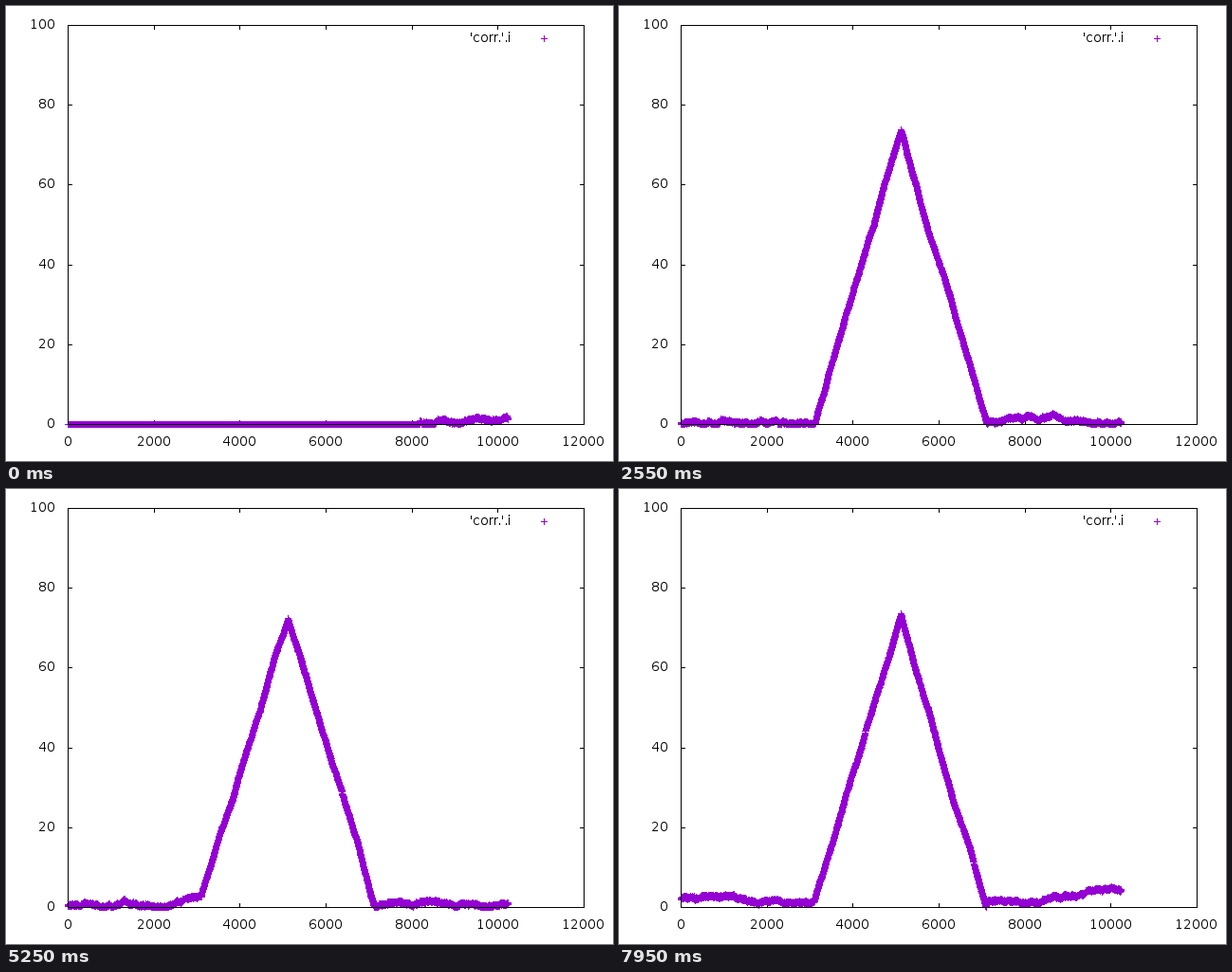
Write a matplotlib script that moves like this. It is 640 px wide and 480 px high and loops after 8000 ms.

```python
import matplotlib.pyplot as plt
import numpy as np
from matplotlib.animation import FuncAnimation
from matplotlib.markers import MarkerStyle

# Whole-pixel glyph advances and thin hinted stems.
plt.rcParams["text.hinting"] = "native"
plt.rcParams["text.hinting_factor"] = 1

WIDTH, HEIGHT, DPI = 640, 480, 100
PX = 72 / DPI
LEFT, RIGHT, TOP, BOTTOM = 65, 609, 20, 441
X_MAX, Y_MAX = 12000, 100
PURPLE = "#9400d3"
FRAME_MS, HOLD, LOOP_MS = 50, 3, 8000

SAMPLES, SIGNAL_START = 10240, 8192
CENTRE, HALF_BASE, PEAK = 5120, 2020, 73.5
KNOT_GAP = 320

samples = np.arange(SAMPLES)


def to_x(value):
    return LEFT + value * (RIGHT - LEFT) / X_MAX


def to_y(value):
    return BOTTOM - value * (BOTTOM - TOP) / Y_MAX


def wander(rng):
    """Slow random drift that keeps returning towards zero."""
    knots = np.arange(0, SAMPLES + KNOT_GAP, KNOT_GAP)
    level = rng.normal(0, 1.6)
    levels = []
    for _ in knots:
        levels.append(level)
        level = 0.87 * level + rng.normal(0, 0.8)
    return np.interp(samples, knots, levels)


def texture(rng):
    """Fine ripple plus a little jitter on every sample."""
    rough = rng.normal(0, 1, SAMPLES + 100)
    ripple = np.convolve(rough, np.ones(101) / 101, "valid")
    return 2 * ripple + rng.normal(0, 0.13, SAMPLES)


def correlation(step):
    rng = np.random.default_rng(100 + step)
    if step == 0:
        # Silence, then the signal fades in.
        fade = (samples - SIGNAL_START) / (SAMPLES - SIGNAL_START)
        swell = 0.35 * np.cos(2 * np.pi * (samples - 8600) / 850)
        rise = np.abs(0.1 + 1.3 * fade + swell + texture(rng))
        return np.where(fade > 0, rise, 0)
    triangle = PEAK * np.maximum(0, 1 - np.abs(samples - CENTRE) / HALF_BASE)
    return np.abs(triangle + wander(rng) + texture(rng))


fig = plt.figure(figsize=(WIDTH / DPI, HEIGHT / DPI), dpi=DPI, facecolor="white")
ax = fig.add_axes([0, 0, 1, 1])
ax.set(xlim=(0, WIDTH), ylim=(HEIGHT, 0))
ax.axis("off")


def rule(xs, ys, z=2):
    ax.plot(xs, ys, color="black", lw=PX, zorder=z, solid_capstyle="projecting")


def label(x, y, text, align):
    ax.text(x, y, text, ha=align, va="baseline", fontsize=14 * PX,
            family="DejaVu Sans", color="black")


def crosses(xs, ys):
    plus = MarkerStyle("+", capstyle="projecting")
    return ax.plot(xs, ys, ls="none", marker=plus, ms=6 * PX, mew=PX,
                   color=PURPLE, zorder=3)[0]


for value in range(0, X_MAX + 1, 2000):
    x = round(to_x(value))
    rule([x, x], [BOTTOM, BOTTOM - 4])
    rule([x, x], [TOP, TOP + 4])
    label(x, 464, str(value), "center")

for value in range(0, Y_MAX + 1, 20):
    y = round(to_y(value))
    rule([LEFT, LEFT + 4], [y, y])
    rule([RIGHT, RIGHT - 4], [y, y])
    label(52, y + 4, str(value), "right")

rule([LEFT, RIGHT, RIGHT, LEFT, LEFT], [TOP, TOP, BOTTOM, BOTTOM, TOP], z=4)
label(532.5, 38, "'corr.'.i", "right")
crosses([567], [34])
trace = crosses(to_x(samples), to_y(correlation(0)))


def update(frame):
    trace.set_ydata(to_y(correlation(frame // HOLD)))
    return [trace]


animation = FuncAnimation(fig, update, frames=LOOP_MS // FRAME_MS,
                          interval=FRAME_MS, repeat=True, repeat_delay=0)
plt.show()
```
